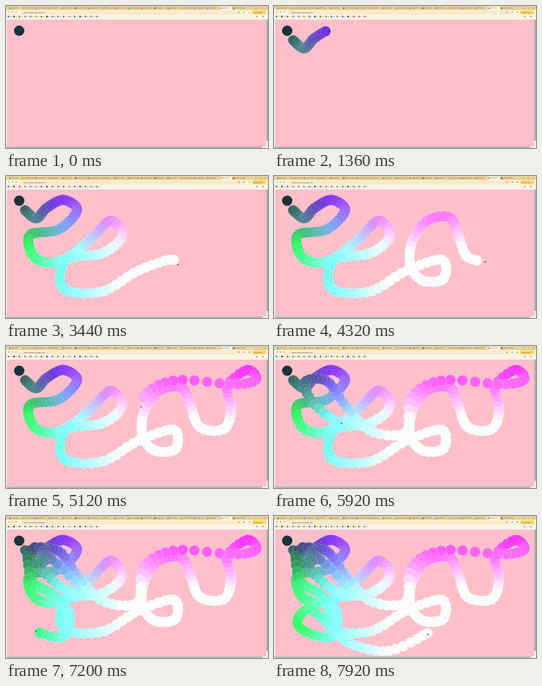
These frames come from a looping animation (328x178 px, 8 s). An HTML page with a canvas:

```html
<!DOCTYPE html>
<html lang="en">
<head>
<meta charset="utf-8">
<title>Brush trail</title>
<style>
  html, body { margin: 0; width: 100%; height: 100%; overflow: hidden; background: #ffc0cb; }
  canvas, svg { position: absolute; left: 0; top: 0; width: 328px; height: 178px; display: block; }
  text { font-family: Roboto, Arial, sans-serif; font-size: 2px; }
</style>
</head>
<body>
<canvas id="stage"></canvas>
<svg id="chrome" viewBox="0 0 328 178"></svg>
<script>
const LOOP = 8000, STEP = 80, SAMPLE = 20, RADIUS = 6.5, START = 960, END = 7920;

// Path nodes; each leg spaces its points evenly up to its end time.
const nodes = [{ t: START, x: 24, y: 43 }];
function leg(end, points) {
  const from = nodes[nodes.length - 1].t;
  points.forEach(([x, y], i) =>
    nodes.push({ t: from + (end - from) * (i + 1) / points.length, x, y }));
}

// Scribble that winds around one spot with a changing radius.
function scribble(cx, cy, turns, count) {
  return Array.from({ length: count }, (_, i) => {
    const a = (i + 1) / count * turns * 2 * Math.PI;
    const r = 9 + 4 * Math.cos(1.2 * a);
    return [cx + r * Math.cos(a), cy + r * Math.sin(a)];
  });
}

leg(2320, [[38, 53], [51, 40], [72, 30], [89, 43], [66, 67], [30, 74], [34, 100], [56, 109], [81, 100]]);
leg(3440, [[108, 77], [131, 56], [145, 76], [120, 97], [75, 105], [72, 141], [120, 145], [165, 119], [210, 105]]);
leg(5120, [[212, 129], [186, 131], [171, 112], [173, 82], [192, 56], [220, 52], [231, 75], [243, 102],
  [273, 104], [282, 78], [277, 50], [302, 30], [313, 42], [286, 48], [212, 43], [172, 64]]);
leg(5920, [[165, 108], [122, 107], [90, 75], [66, 44], [39, 45], [48, 70], [79, 95]]);
leg(6160, [[88, 85], [53, 51]]);
leg(6720, scribble(40, 51, 2.5, 20));
leg(7200, [[33, 82], [58, 98], [79, 122], [72, 151], [42, 146]]);
leg(END, [[29, 132], [45, 117], [74, 141], [96, 160], [144, 169], [192, 147]]);

function pointer(t) {
  if (t < START) return [16.5, 31];
  const last = nodes.length - 1;
  let i = 0;
  while (i < last - 1 && nodes[i + 1].t <= t) i++;
  const f = Math.min(1, (t - nodes[i].t) / (nodes[i + 1].t - nodes[i].t));
  const near = k => nodes[Math.max(0, Math.min(last, k))];
  const p = near(i - 1), q = near(i), r = near(i + 1), s = near(i + 2);
  const curve = (a, b, c, d) =>
    b + f / 2 * (c - a + f * (2 * a - 5 * b + 4 * c - d + f * (3 * b - a - 3 * c + d)));
  return [curve(p.x, q.x, r.x, s.x), curve(p.y, q.y, r.y, s.y)];
}

const canvas = document.getElementById('stage');
const ctx = canvas.getContext('2d');
const dpr = window.devicePixelRatio || 1;
canvas.width = 328 * dpr;
canvas.height = 178 * dpr;
ctx.scale(dpr, dpr);

const dabs = [[0, ...pointer(0)]];
for (let t = START; t <= END; t += SAMPLE) dabs.push([t, ...pointer(t)]);

// The brush colour follows the pointer position.
function brush(x, y) {
  const c = v => Math.max(0, Math.min(255, Math.round(v)));
  return `rgb(${c(1.75 * x)},${c(3.5 * (y - 17))},${c(3.5 * x)})`;
}

function draw(t) {
  ctx.fillStyle = '#ffc0cb';
  ctx.fillRect(0, 0, 328, 178);
  ctx.strokeStyle = 'rgba(232,222,232,.55)';
  ctx.lineWidth = 0.35;
  for (const [start, x, y] of dabs) {
    if (start > t) break;
    ctx.beginPath();
    ctx.arc(x, y, RADIUS, 0, 2 * Math.PI);
    ctx.fillStyle = brush(x, y);
    ctx.fill();
    if (start) ctx.stroke();
  }
  const [px, py] = pointer(t + 30);
  ctx.fillStyle = '#222';
  ctx.beginPath();
  ctx.moveTo(px, py);
  ctx.lineTo(px + 1.6, py + 1.7);
  ctx.lineTo(px, py + 2.3);
  ctx.fill();
}

function buildChrome() {
  const out = [];
  const box = (x, y, w, h, fill, r = 0) =>
    out.push(`<rect x="${x}" y="${y}" width="${w}" height="${h}" rx="${r}" fill="${fill}"/>`);
  const label = (x, y, s, fill = '#4a4030') =>
    out.push(`<text x="${x}" y="${y}" fill="${fill}">${s}</text>`);
  const hues = ['#3d6fc4', '#333', '#c8443a', '#4a9a5a', '#8a5ab0', '#d08a30'];
  const titles = ['Brush trail', 'Lesson notes', 'Drawing tips', 'Reference'];

  box(0, 0, 328, 5, '#e9d19b');
  for (let i = 0; i < 18; i++) {
    const x = 4 + i * 16.5;
    if (i === 16) box(x - 1, 0.8, 16, 4.2, '#fff7e4', 1);
    box(x, 1.8, 1.8, 1.8, hues[i * 5 % 6], 0.9);
    label(x + 2.6, 3.4, titles[i % 4]);
    box(x + 15, 1.5, 0.3, 2.4, '#a88f5e');
  }
  for (let x = 312; x < 328; x += 6) box(x, 2.3, 1.4, 0.5, '#5c4c2c');

  box(0, 5, 328, 5.5, '#fff5df');
  for (let x = 3; x < 13; x += 4.5) box(x, 7.2, 1.6, 0.7, '#665d4c');
  box(17, 5.6, 279, 4.3, '#f8ebcb', 2);
  label(22, 8.5, 'sketch.local/brush/index.html', '#222');
  for (let x = 291; x < 306; x += 6.5) box(x, 7, 1.4, 1.4, '#665d4c', 0.7);
  box(308, 5.5, 18, 4.5, '#ffd45c', 2);
  label(310, 8.5, 'Update now', '#5c430c');

  box(0, 10.5, 328, 6, '#fff5df');
  for (let i = 0; i < 17; i++) {
    const x = 2 + i * 6.9;
    box(x, 12.2, 2, 2, hues[i * 7 % 6], 0.6);
    box(x + 2.6, 13, 2.4, 0.5, '#a49b88');
  }
  box(313, 12.5, 1.4, 1.4, '#777');
  box(321, 12.5, 1.4, 1.4, '#777');

  box(0, 16, 1, 162, '#fff');
  box(0, 16, 328, 0.8, '#fff');
  box(326, 16, 2, 162, '#eee');
  box(326.4, 17, 1.2, 152, '#858585');
  box(0, 176, 328, 2, '#eee');
  box(1, 176.5, 320, 1, '#858585');
  document.getElementById('chrome').innerHTML = out.join('');
}

buildChrome();
const began = performance.now();
let shown = -1;
function tick() {
  const t = Math.floor((performance.now() - began) % LOOP / STEP) * STEP;
  if (t !== shown) draw(shown = t);
  requestAnimationFrame(tick);
}
tick();
</script>
</body>
</html>
```
